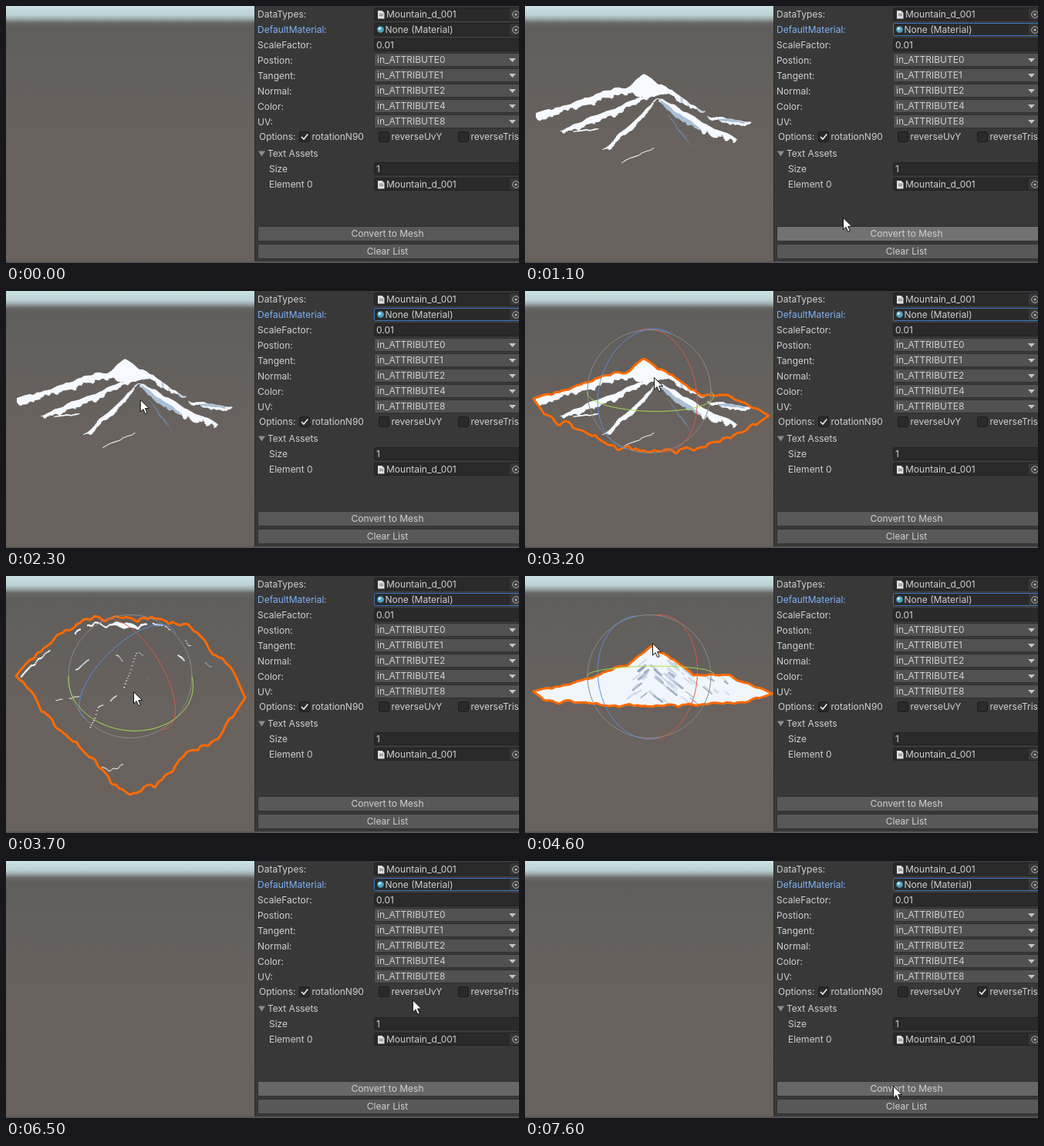
Recreate the animation shown at these times as an HTML page with a canvas. Size 665 by 334 pixels, loop 8 s.

```html
<!DOCTYPE html>
<html lang="en">
<head>
<meta charset="utf-8">
<title>Convert to Mesh</title>
<style>
html, body { margin: 0; width: 100%; height: 100%; overflow: hidden; background: #383838; }
canvas, svg { position: absolute; left: 0; top: 0; }
text { font: 12px Inter, Roboto, sans-serif; fill: #d0d0d0; }
</style>
</head>
<body>
<canvas id="scene" width="322" height="334"></canvas>
<svg id="ui" width="665" height="334"></svg>
<script>
const $ = id => document.getElementById(id);
const ctx = $('scene').getContext('2d');
const mix = (a, b, k) => a + (b - a) * k;
const clamp = v => Math.max(0, Math.min(1, v));
const hash = n => { const s = Math.sin(n * 127.1) * 43758.5453; return s - Math.floor(s); };
const smooth = n => { const i = Math.floor(n), f = n - i; return mix(hash(i), hash(i + 1), f * f * (3 - 2 * f)) - .5; };
const rough = n => smooth(n) + smooth(n * 2.3 + 50) * .5;

// Inspector panel
const text = (x, y, s, attrs = '') => `<text x="${x}" y="${y}" ${attrs}>${s}</text>`;
const box = (x, y, w, h, fill, line, attrs = '') =>
  `<rect x="${x + .5}" y="${y + .5}" width="${w - 1}" height="${h - 1}" rx="2" fill="${fill}" stroke="${line}" ${attrs}/>`;
const field = (y, attrs) => box(477, y - 9, 200, 17, '#2a2a2a', '#212121', attrs);
const picker = y => `<rect x="653" y="${y - 8}" width="12" height="15" fill="#373737"/>
  <circle cx="661" cy="${y}" r="4.3" fill="none" stroke="#b5b5b5"/><circle cx="661" cy="${y}" r="1.6" fill="#b5b5b5"/>`;
const fileIcon = y => `<path d="M482 ${y - 5}h5.5l3 3v7.5h-8.5z" fill="#dedede"/>
  <path d="M484 ${y - .5}h5m-5 2h5" stroke="#777"/>`;
const asset = y => field(y) + fileIcon(y) + text(493, y + 4, 'Mountain_d_001') + picker(y);
const dropdown = (y, s) => box(477, y - 9, 200, 18, '#515151', '#303030') + text(481, y + 4, s) +
  `<path d="M652 ${y - 2}h9l-4.5 5z" fill="#c4c4c4"/>`;
const check = (x, s, id, on) => box(x, 163, 14, 14, '#2a2a2a', '#1c1c1c') +
  `<path id="${id}" d="M${x + 3} 170l3 3 5.3-6.5" fill="none" stroke="#eee" stroke-width="1.6" visibility="${on ? 'visible' : 'hidden'}"/>` +
  text(x + 16.5, 174, s);
const button = (y, s, id) => box(326, y, 345, 20, '#585858', '#303030', `id="${id}"`) +
  text(494.5, y + 14, s, 'text-anchor="middle"');

const channels = ['Postion:0', 'Tangent:1', 'Normal:2', 'Color:4', 'UV:8'].map((c, i) => {
  const y = 70 + i * 20;
  return text(326, y + 5, c.slice(0, -1)) + dropdown(y, 'in_ATTRIBUTE' + c.slice(-1));
}).join('');

$('ui').innerHTML = `
  <rect x="322" width="343" height="334" fill="#383838"/>
  <path d="M322.5 0V334" stroke="#2c2c2c"/>
  <path d="M0 333H665" stroke="#555" stroke-width="2"/>` +
  text(326, 15, 'DataTypes:') + asset(11) +
  text(326, 35, 'DefaultMaterial:', 'style="fill:#7fb2f5"') + field(31, 'id="focus"') +
  `<circle cx="485.5" cy="30.5" r="4.3" fill="#4fa3c2"/><circle cx="484.3" cy="29.2" r="1.8" fill="#c9f0f8"/>` +
  text(491.5, 35, 'None (Material)') + picker(31) +
  text(326, 55, 'ScaleFactor:') + field(51) + text(480, 55, '0.01') + channels +
  text(328, 174, 'Options:') + check(380, 'rotationN90', 'rotation', true) +
  check(483, 'reverseUvY', 'uv', false) + check(586, 'reverseTris', 'tris', false) +
  '<path d="M327 188.5h9l-4.5 7z" fill="#8c8c8c"/>' + text(339, 196, 'Text Assets') +
  text(341, 216, 'Size') + field(212) + text(480, 216, '1') +
  text(341, 236, 'Element 0') + asset(232) +
  button(286, 'Convert to Mesh', 'convert') + button(309, 'Clear List', 'clear') +
  '<path id="cursor" d="M.5 .5V16l3.6-3.4 2.6 6 2.6-1.1-2.6-5.9h5z" fill="#fff" stroke="#111"/>';

// Key points of the upper and lower silhouette, seen from below, the side and above
const MID = 15.8;
const poses = [
  { pitch: -8, rough: [4, 5],
    top: [[11,150], [45,142], [95,130], [135,114], [165,90], [220,128], [265,130], [321,153]],
    low: [[11,150], [25,162], [100,168], [200,168], [285,164], [321,153]] },
  { pitch: MID, rough: [5, 10],
    top: [[11,140], [45,129], [92,115], [135,104], [153,87], [185,106], [230,136], [268,137], [316,162]],
    low: [[11,140], [24,160], [80,188], [125,204], [190,208], [235,202], [290,179], [316,162]] },
  { pitch: 52, rough: [9, 12],
    top: [[13,130], [37,102], [66,76], [106,59], [145,53], [200,55], [238,66], [268,98], [290,116], [310,158]],
    low: [[13,130], [42,162], [53,186], [76,210], [118,240], [135,268], [165,282], [203,266], [228,235], [274,212], [310,158]] }
];

function at(points, x) {
  let i = 0;
  while (i < points.length - 2 && points[i + 1][0] < x) i++;
  const [a, b] = [points[i], points[i + 1]];
  return mix(a[1], b[1], clamp((x - a[0]) / (b[0] - a[0])));
}

// Edges at a fraction u across the mountain
function shape(pitch) {
  const [a, b] = pitch < MID ? poses : poses.slice(1);
  const k = clamp((pitch - a.pitch) / (b.pitch - a.pitch));
  const xOf = (p, u) => mix(p.top[0][0], p.top.at(-1)[0], u);
  const edge = (name, side) => u => {
    const calm = Math.min(1, u * 12, (1 - u) * 12);
    const bump = mix(a.rough[side], b.rough[side], k) * calm * rough(u * 28 + side * 90);
    return mix(at(a[name], xOf(a, u)), at(b[name], xOf(b, u)), k) + bump;
  };
  return { x: u => mix(xOf(a, u), xOf(b, u), k), top: edge('top', 0), low: edge('low', 1) };
}

function outline(s) {
  const p = new Path2D(), n = 160;
  for (let i = 0; i <= n; i++) p.lineTo(s.x(i / n), s.top(i / n));
  for (let i = n; i >= 0; i--) p.lineTo(s.x(i / n), s.low(i / n));
  p.closePath();
  return p;
}

const rest = shape(MID);

// Ridges: from x, y to x, y, thickness, colour
const white = '#f6faff', blue = '#a9bfd6';
const ridges = [
  [45,161, 162,114, 9, white], [100,187, 172,120, 8, white], [172,118, 273,174, 12, white],
  [236,143, 292,150, 6, white], [125,203, 166,184, 1, white], [62,163, 95,159, 2, white],
  [174,122, 225,160, 7, blue], [186,142, 214,181, 2, '#6c87a6'], [250,145, 284,150, 3, blue]
];

function ridge([x0, y0, x1, y1, thick, color], s, under, over, seed) {
  ctx.fillStyle = color;
  for (let x = x0; x < x1; x += 1.5) {
    if (over > .1 && hash(Math.floor(x / 9) + seed * 31) < over * .72) continue;
    const k = (x - x0) / (x1 - x0), u = (x - 11) / 305;
    const y = mix(y0, y1, k) + rough(x / 12 + seed * 20) * 4;
    const v = (y - rest.top(u)) / (rest.low(u) - rest.top(u));
    const h = thick * (Math.sqrt(Math.sin(Math.PI * k)) + rough(x / 5 + seed) * .6);
    ctx.fillRect(s.x(u), mix(s.top(u), s.low(u), v), 2.1, Math.max(.8, h * (1 + 4 * under) * (1 - .85 * over)));
  }
}

function crest(s, under, over) {
  const peak = (x, w) => Math.exp(-(((x - 156) / w) ** 2));
  for (let x = 14; x < 232; x += 1.5) {
    const u = (x - 11) / 305;
    if (over > .1 && hash(Math.floor(x / 8)) < over * .45 * (1 - peak(x, 30))) continue;
    const h = 9 + 23 * peak(x, 14) + rough(x / 6) * 7;
    ctx.fillStyle = x > 160 && rough(x / 7 + 9) > .1 ? '#c3d3e4' : white;
    ctx.fillRect(s.x(u), s.top(u) + 7 * over, 2.1, h * clamp((236 - x) / 25) * (1 + 4 * under) * (1 - .78 * over));
  }
}

// Soft slanted shadows on the slopes
function slopes() {
  ctx.lineCap = 'round';
  for (let i = 0; i < 70; i++) {
    const x = mix(130, 225, (hash(i) + hash(i + 300)) / 2) + (i % 5 ? 0 : 60), y = mix(108, 160, hash(i + 80));
    const w = 3 + hash(i + 160) * 9;
    ctx.strokeStyle = i % 3 ? '#c3d2e2' : '#8195ad';
    ctx.lineWidth = 1 + hash(i + 240) * 2.5;
    ctx.beginPath();
    ctx.moveTo(x, y);
    ctx.lineTo(x + (x < 160 ? -w : w), y + w * .8);
    ctx.stroke();
  }
}

function mountain(pitch, selected) {
  const s = shape(pitch), path = outline(s);
  const under = clamp((MID - pitch) / 23.8), over = clamp((pitch - MID) / 36.2);
  ctx.save();
  ctx.clip(path);
  crest(s, under, over);
  ridges.forEach((r, i) => ridge(r, s, under, over, i + 1));
  ctx.globalAlpha = under;
  ctx.fillStyle = '#f1f6fc';
  ctx.fill(path);
  ctx.globalAlpha = under * .7;
  slopes();
  ctx.restore();
  if (!selected) return;
  ctx.strokeStyle = '#ff6a00';
  ctx.lineWidth = 3;
  ctx.lineJoin = 'round';
  ctx.stroke(path);
  gizmo(pitch * Math.PI / 180);
}

// Front halves of three great circles with slight off-axis perspective
function gizmo(tilt) {
  const r = 80, cx = 161, cy = 130.5, c = Math.cos(tilt), n = Math.sin(tilt);
  ctx.lineWidth = 1;
  ctx.strokeStyle = '#8b8a88';
  ctx.beginPath();
  ctx.arc(cx, cy, r, 0, 7);
  ctx.stroke();
  const ring = (color, point) => {
    ctx.strokeStyle = color;
    ctx.beginPath();
    let drawing = false;
    for (let i = 0; i <= 240; i++) {
      const [x, y, z] = point(i * Math.PI / 120);
      const depth = z * c + y * n, near = 1 + .2 * depth;
      const front = depth >= 0;
      if (front) ctx[drawing ? 'lineTo' : 'moveTo'](cx + r * (x * near + .12 * depth), cy - r * (y * c - z * n) * near);
      drawing = front;
    }
    ctx.stroke();
  };
  const upright = (x, z) => a => [x * Math.cos(a), Math.sin(a), z * Math.cos(a)];
  ring('#dd5a42', upright(.59, .81));
  ring('#5b8fe6', upright(-.81, .59));
  ring('#a4e04e', a => [Math.cos(a), 0, Math.sin(a)]);
}

// Pointer moves: start, end, target x, y
const moves = [
  [200, 500, 453, 299], [1000, 1400, 289, 202], [1400, 1800, 194, 162], [2000, 2400, 167, 134],
  [2500, 2600, 167, 112], [3200, 3700, 165, 150], [4000, 4600, 165, 87], [4600, 4900, 167, 104],
  [5000, 5400, 298, 217], [5400, 5800, 306, 224], [5800, 6700, 590, 168], [7000, 7600, 477, 292]
];
const pointer = t => moves.reduce(([x, y], [start, end, toX, toY]) => {
  const k = clamp((t - start) / (end - start));
  return [mix(x, toX, k), mix(y, toY, k)];
}, [650, 203]);

const sky = ctx.createLinearGradient(0, 0, 0, 334);
[[0, '#cbe3e6'], [12, '#bbd0d3'], [17, '#9aa6a8'], [22, '#686867'], [28, '#5f5e5d'], [70, '#625f5c'], [180, '#69625e'], [334, '#69615c']]
  .forEach(([y, c]) => sky.addColorStop(y / 334, c));

function draw(now) {
  const t = Math.floor(now % 8000 / 100) * 100;
  const within = (a, b) => t >= a && t < b;
  const [x, y] = pointer(t);
  ctx.fillStyle = sky;
  ctx.fillRect(0, 0, 322, 334);
  if (within(1100, 5000)) mountain(t < 2600 ? MID : -8 + (y - 87) * .952, t >= 2600);
  const set = (id, name, value) => $(id).setAttribute(name, value);
  set('cursor', 'transform', `translate(${x} ${y})`);
  set('cursor', 'visibility', t < 200 ? 'hidden' : 'visible');
  set('focus', 'stroke', t >= 900 && !within(6700, 6900) ? '#3a79bb' : '#212121');
  set('tris', 'visibility', t >= 6900 ? 'visible' : 'hidden');
  set('convert', 'fill', within(700, 900) ? '#46607c' : within(900, 1500) ? '#727272' : t >= 6100 ? '#676767' : '#585858');
  requestAnimationFrame(draw);
}
requestAnimationFrame(draw);
</script>
</body>
</html>
```
